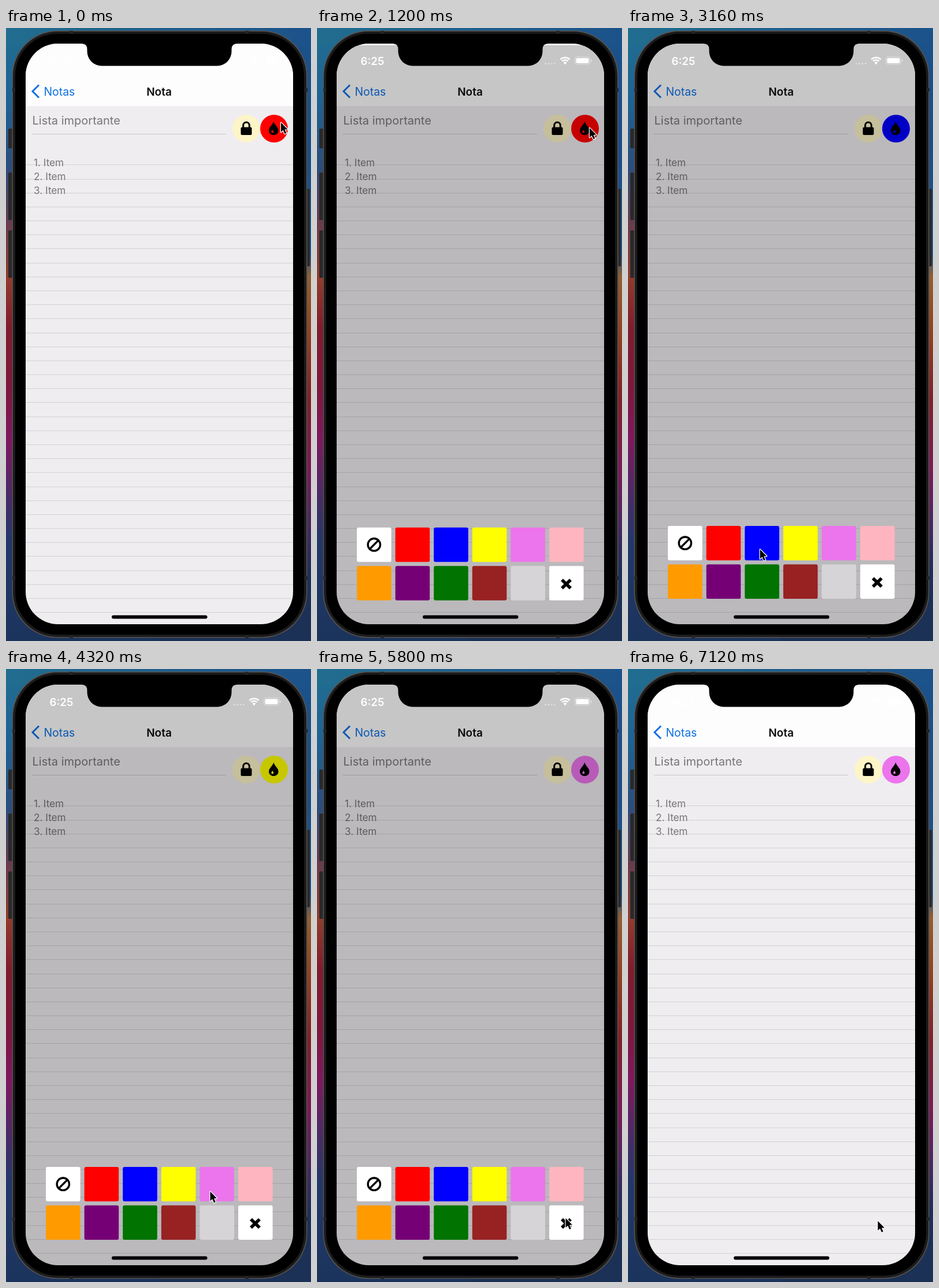
These frames come from a looping animation (528x1060 px, 7.16 s). An HTML page with a canvas:

```html
<!DOCTYPE html>
<html lang="es">
<head>
<meta charset="utf-8">
<title>Nota</title>
<style>
  html, body { margin: 0; width: 100%; height: 100%; overflow: hidden; background: #000; }
  canvas { display: block; width: 528px; height: 1060px; }
</style>
</head>
<body>
<canvas id="stage" width="528" height="1060"></canvas>
<script>
const ctx = document.getElementById('stage').getContext('2d');
const LOOP = 7160;
const SCREEN = { x: 34, y: 27, w: 463, h: 1004 };
const PAPER = [239, 237, 240];
const BLACK = [0, 0, 0];
const RED = [255, 0, 0], BLUE = [0, 0, 255], YELLOW = [255, 255, 0], VIOLET = [236, 116, 236];
const SWATCHES = ['#fff', '#f00', '#00f', '#ff0', '#ec74ec', '#ffb5c0',
                  '#ff9b00', '#750075', '#007300', '#982222', '#d6d4d7', '#fff'];

// Cursor path: [start, end, x, y]
const MOVES = [
  [1150, 1800, 146, 917], [2060, 2500, 228, 901], [3240, 3600, 290, 903],
  [3920, 4260, 353, 903], [4900, 5450, 430, 949], [6450, 6700, 432, 954]
];
const PICKS = [[0, RED], [2800, BLUE], [3760, YELLOW], [4680, VIOLET]];
const OPEN = 756, CLOSE = 6260;

const clamp = v => Math.max(0, Math.min(1, v));
const ease = v => v < 0.5 ? 2 * v * v : 1 - 2 * (1 - v) ** 2;
const lerp = (a, b, k) => a + (b - a) * k;
const mix = (a, b, k) => `rgb(${a.map((v, i) => Math.round(lerp(v, b[i], k)))})`;
const spring = ms => {
  const v = Math.max(0, ms) * 0.01826;
  return 1 - Math.exp(-v) * (1 + v);
};

function box(x, y, w, h, r, fill) {
  ctx.beginPath();
  ctx.roundRect(x, y, w, h, r);
  ctx.fillStyle = fill;
  ctx.fill();
}

function disc(x, y, r, fill) {
  ctx.beginPath();
  ctx.arc(x, y, r, 0, 7);
  ctx.fillStyle = fill;
  ctx.fill();
}

function line(points, color, width, cap = 'butt') {
  ctx.beginPath();
  points.forEach(([x, y]) => ctx.lineTo(x, y));
  ctx.strokeStyle = color;
  ctx.lineWidth = width;
  ctx.lineCap = cap;
  ctx.stroke();
}

function text(str, x, y, size, color, weight = 400, align = 'left') {
  ctx.font = `${weight} ${size}px Inter, sans-serif`;
  ctx.textAlign = align;
  ctx.fillStyle = color;
  ctx.fillText(str, x, y);
}

function wallpaper(x, w, stops) {
  const g = ctx.createLinearGradient(0, 0, 0, 1060);
  stops.forEach(([y, c]) => g.addColorStop(y / 1060, c));
  ctx.fillStyle = g;
  ctx.fillRect(x, 0, w, 1060);
}

function phone() {
  wallpaper(0, 264, [[0, '#216d8f'], [120, '#1d6496'], [240, '#2b4d7c'], [330, '#653c50'],
    [430, '#923c2b'], [520, '#801c2d'], [630, '#7d183f'], [710, '#801860'],
    [800, '#4e2a66'], [890, '#22386a'], [1060, '#1b345c']]);
  wallpaper(264, 264, [[0, '#1c528a'], [200, '#184f88'], [390, '#1d568b'], [430, '#925f31'],
    [520, '#934321'], [640, '#822029'], [760, '#7c1a58'], [850, '#4c285f'],
    [940, '#1d3058'], [1060, '#1b3155']]);
  const top = ctx.createLinearGradient(0, 0, 528, 0);
  top.addColorStop(0, '#216d8f');
  top.addColorStop(1, '#1c528a');
  ctx.fillStyle = top;
  ctx.fillRect(0, 0, 528, 30);

  [[174, 34], [250, 82], [350, 82]].forEach(([y, h]) => box(4, y, 9, h, 1.5, '#29292b'));
  box(518, 278, 8, 134, 1.5, '#29292b');
  box(10.5, 4.5, 511, 1050, 78, '#59534f');
  box(12, 6, 508, 1047, 77, '#1b1b1c');
  box(16, 10, 500, 1039, 73, '#000');
  [[11, 104], [11, 948], [517, 104], [517, 948]].forEach(([x, y]) => box(x, y, 5, 6, 0, '#252525'));
  [[110, 5], [414, 5], [110, 1050], [414, 1050]].forEach(([x, y]) => box(x, y, 6, 5, 0, '#252525'));
}

function lock() {
  disc(416, 174, 24, '#fdf4c8');
  box(406.5, 171.5, 19, 13.5, 2, '#000');
  ctx.beginPath();
  ctx.moveTo(410.7, 173);
  ctx.lineTo(410.7, 168.3);
  ctx.arc(416, 168.3, 5.3, Math.PI, 0);
  ctx.lineTo(421.3, 173);
  ctx.strokeStyle = '#000';
  ctx.lineWidth = 3;
  ctx.stroke();
}

function drop(x, y, r, h, fill) {
  ctx.beginPath();
  ctx.moveTo(x, y);
  ctx.bezierCurveTo(x + r * 0.25, y + h * 0.3, x + r, y + h * 0.42, x + r, y + h * 0.67);
  ctx.bezierCurveTo(x + r, y + h * 1.11, x - r, y + h * 1.11, x - r, y + h * 0.67);
  ctx.bezierCurveTo(x - r, y + h * 0.42, x - r * 0.25, y + h * 0.3, x, y);
  ctx.fillStyle = fill;
  ctx.fill();
}

function note(t) {
  ctx.fillStyle = mix(PAPER, BLACK, 0);
  ctx.fillRect(SCREEN.x, SCREEN.y, SCREEN.w, SCREEN.h);
  ctx.fillStyle = '#fdfdfd';
  ctx.fillRect(SCREEN.x, SCREEN.y, SCREEN.w, 108);
  line([[57, 98.5], [46, 109.5], [57, 120.5]], '#0b70e5', 3);
  text('Notas', 65.5, 117, 19.4, '#0b70e5');
  text('Nota', 265, 117, 19, '#0c0c0d', 600, 'center');

  for (let i = 0; i < 33; i++) {
    ctx.fillStyle = '#d3d1d5';
    ctx.fillRect(SCREEN.x, Math.round(236.4 + i * 24.18), SCREEN.w, 1);
  }
  text('Lista importante', 45.5, 167, 20, '#777578');
  ctx.fillStyle = '#c8c6ca';
  ctx.fillRect(45, 183, 336, 1);
  for (let i = 0; i < 3; i++) text(`${i + 1}. Item`, 48, 238.5 + i * 24, 17.2, '#777578');

  lock();
  const color = PICKS.filter(p => p[0] <= t).pop()[1];
  const fade = 0.8 * (ease(clamp((t - 570) / 150)) - ease(clamp((t - 720) / 250)));
  disc(464, 174, 24, mix(color, PAPER, fade));
  drop(463.3, 161.5, 8.3, 23.5, mix(BLACK, PAPER, fade));
  drop(461.3, 175.5, 2, 6, mix(color, PAPER, fade));
}

function palette(t) {
  const shown = spring(t - OPEN) - spring(t - CLOSE);
  if (shown < 0.0005) return;
  ctx.save();
  ctx.translate(0, SCREEN.h * (1 - shown));
  ctx.fillStyle = 'rgba(0,0,0,0.22)';
  ctx.fillRect(SCREEN.x, SCREEN.y, SCREEN.w, SCREEN.h);
  SWATCHES.forEach((c, i) => box(69 + (i % 6) * 66.6, i < 6 ? 861 : 927.5, 59.6, 59.6, 3, c));

  ctx.beginPath();
  ctx.arc(98.8, 890.7, 10.7, 0, 7);
  ctx.strokeStyle = '#000';
  ctx.lineWidth = 3.4;
  ctx.stroke();
  line([[91.5, 898], [106, 883.5]], '#000', 3.4);
  line([[424, 951.5], [439, 966]], '#000', 5.6);
  line([[439, 951.5], [424, 966]], '#000', 5.6);
  ctx.restore();
}

function statusBar() {
  text('6:25', 75.5, 63.5, 18.6, '#fff', 600);
  for (let i = 0; i < 4; i++) disc(395.5 + i * 5.2, 61.5, 1.5, 'rgba(255,255,255,0.4)');
  ctx.strokeStyle = '#fff';
  ctx.lineWidth = 2.6;
  ctx.lineCap = 'butt';
  [11.5, 7.3].forEach(r => {
    ctx.beginPath();
    ctx.arc(429.5, 62.5, r, -Math.PI * 0.75, -Math.PI * 0.25);
    ctx.stroke();
  });
  ctx.beginPath();
  ctx.moveTo(429.5, 63.5);
  ctx.arc(429.5, 62.5, 4, -Math.PI * 0.75, -Math.PI * 0.25);
  ctx.fillStyle = '#fff';
  ctx.fill();

  ctx.beginPath();
  ctx.roundRect(446.5, 50, 26, 13, 4);
  ctx.strokeStyle = 'rgba(255,255,255,0.45)';
  ctx.lineWidth = 1.2;
  ctx.stroke();
  box(448.5, 52, 22, 9, 2, '#fff');
  box(474, 54.5, 1.6, 4, 1, 'rgba(255,255,255,0.5)');
}

function notch() {
  ctx.beginPath();
  ctx.moveTo(131, 26);
  ctx.lineTo(131, 27);
  ctx.quadraticCurveTo(140.5, 27, 140.5, 37);
  ctx.arcTo(140.5, 65.5, 170, 65.5, 25);
  ctx.arcTo(390.5, 65.5, 390.5, 37, 25);
  ctx.lineTo(390.5, 37);
  ctx.quadraticCurveTo(390.5, 27, 400, 27);
  ctx.lineTo(400, 26);
  ctx.fillStyle = '#000';
  ctx.fill();
}

function cursor(t) {
  let x = 475.5, y = 163;
  MOVES.forEach(([start, end, toX, toY]) => {
    const k = ease(clamp((t - start) / (end - start)));
    x = lerp(x, toX, k);
    y = lerp(y, toY, k);
  });
  ctx.save();
  ctx.translate(x, y);
  ctx.beginPath();
  [[0.5, 0.5], [0.5, 17], [4.2, 13.6], [7, 20], [9.8, 18.8], [7.1, 12.6], [12, 12.2]]
    .forEach(([px, py]) => ctx.lineTo(px, py));
  ctx.closePath();
  ctx.lineJoin = 'round';
  ctx.strokeStyle = '#fff';
  ctx.lineWidth = 2.4;
  ctx.stroke();
  ctx.fillStyle = '#000';
  ctx.fill();
  ctx.restore();
  ctx.lineJoin = 'miter';
}

function draw() {
  const t = performance.now() % LOOP;
  phone();
  ctx.save();
  ctx.beginPath();
  ctx.roundRect(SCREEN.x, SCREEN.y, SCREEN.w, SCREEN.h, 56);
  ctx.clip();
  note(t);
  palette(t);
  statusBar();
  box(183, 1015.5, 165.5, 6, 3, '#000');
  ctx.restore();
  notch();
  cursor(t);
  requestAnimationFrame(draw);
}
draw();
</script>
</body>
</html>
```
